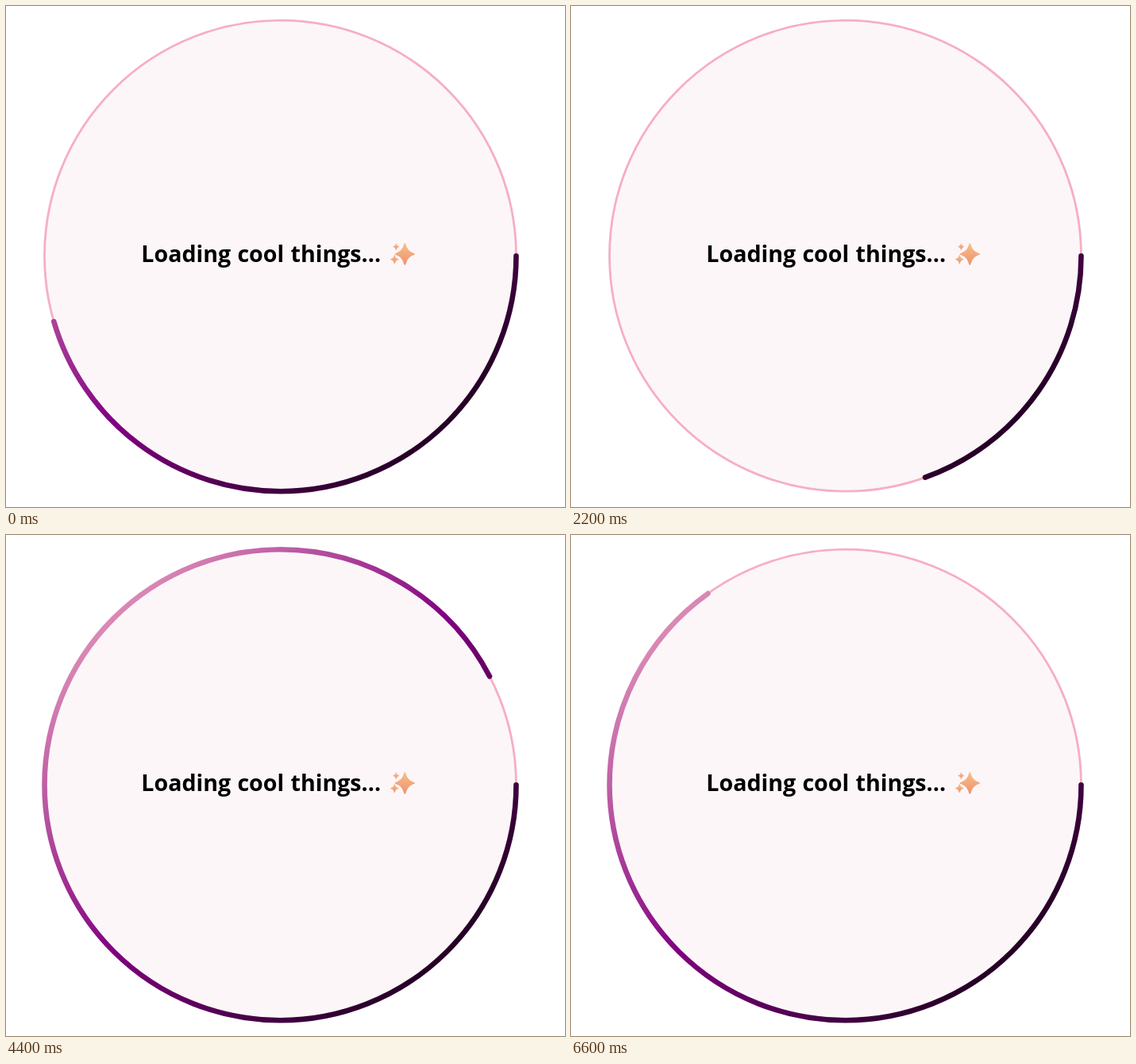
These frames come from a looping animation (704 px wide and 632 px high, 6.7 s). An HTML page:

```html
<!DOCTYPE html>
<html lang="en">
<head>
<meta charset="utf-8">
<title>Loading</title>
<style>
  html, body { margin: 0; width: 100%; height: 100%; overflow: hidden; background: #fff; }
  svg { display: block; width: 704px; height: 632px; }
  text { font: 700 28.6px "Open Sans", "Noto Sans", sans-serif; word-spacing: .8px; }
</style>
</head>
<body>
<svg viewBox="0 0 704 632">
  <defs>
    <linearGradient id="sweep" x1="0" y1="0" x2="1" y2="1">
      <stop offset="0" stop-color="pink"/>
      <stop offset=".5" stop-color="purple"/>
      <stop offset="1" stop-color="black"/>
    </linearGradient>
    <linearGradient id="glow" x1="0" y1="0" x2="0" y2="1">
      <stop offset="0" stop-color="#f9bd86"/>
      <stop offset="1" stop-color="#ec9470"/>
    </linearGradient>
    <path id="star" d="M0-1C.2-.4 .4-.2 1 0C.4 .2 .2 .4 0 1C-.2 .4-.4 .2-1 0C-.4-.2-.2-.4 0-1Z"
      fill="url(#glow)" stroke="url(#glow)" stroke-width=".14" stroke-linejoin="round"/>
  </defs>
  <circle cx="345.5" cy="315.2" r="297" fill="#fcf6f9" stroke="#f6aec6" stroke-width="2.8"/>
  <circle id="arc" cx="345.5" cy="315.2" r="297" pathLength="1" fill="none"
    stroke="url(#sweep)" stroke-width="6.6" stroke-linecap="round"/>
  <text x="170.3" y="323">Loading cool things...</text>
  <use href="#star" transform="translate(502.3 313) scale(11.8 13)"/>
  <use href="#star" transform="translate(491.3 303.6) scale(3.8 4.1)"/>
  <use href="#star" transform="translate(489.3 319.6) scale(5 5.4)"/>
</svg>
<script>
  const LOOP = 6700, STEP = 100;
  // [ms, turns swept]; close to one turn every three seconds
  const keys = [[0, .455], [1600, .9963], [2200, 1.195], [3600, 1.664],
                [4400, 1.9237], [5700, 2.367], [6600, 2.651]];
  const arc = document.getElementById('arc');

  function turnsAt(time) {
    const next = Math.max(1, keys.findIndex(key => key[0] >= time));
    const [t0, a] = keys[next - 1], [t1, b] = keys[next];
    return a + (b - a) * (time - t0) / (t1 - t0);
  }

  function draw(now) {
    const time = Math.floor((now % LOOP) / STEP) * STEP;
    arc.setAttribute('stroke-dasharray', `${(turnsAt(time) % 1).toFixed(5)} 2`);
  }

  const start = performance.now();
  function tick() {
    draw(performance.now() - start);
    requestAnimationFrame(tick);
  }
  tick();
</script>
</body>
</html>
```
